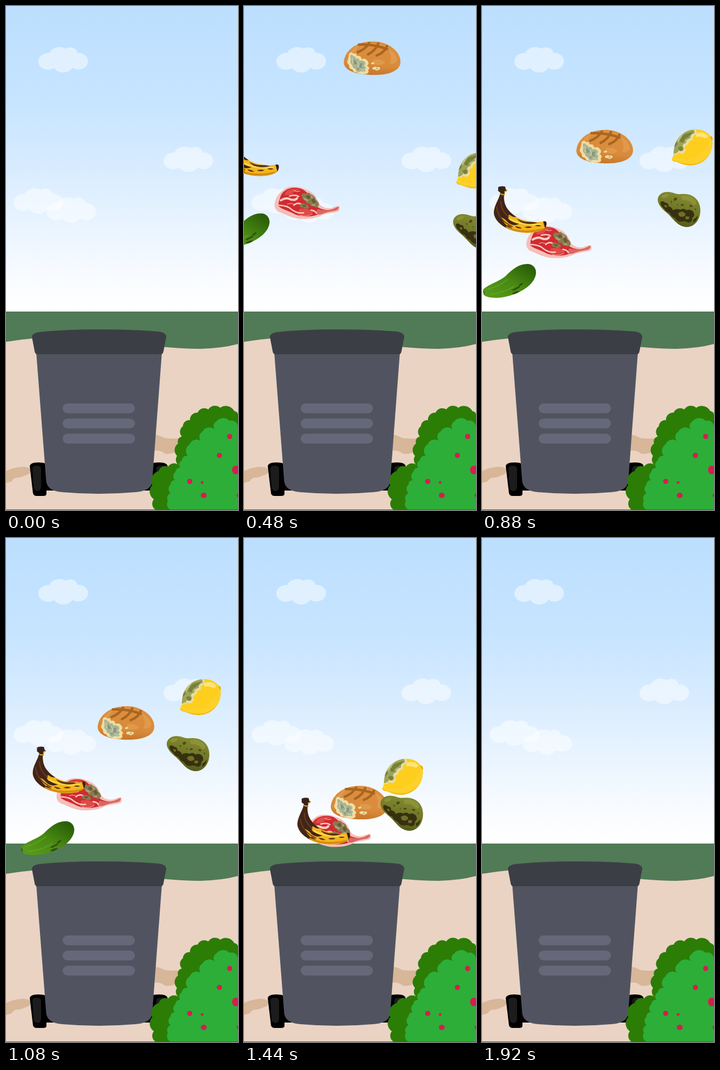
These frames come from a looping animation (430 px wide and 932 px high, 2000 ms). An HTML page:

```html
<!DOCTYPE html>
<html lang="en">
<head>
<meta charset="utf-8">
<title>Food waste</title>
<style>
  html, body { margin: 0; width: 100%; height: 100%; overflow: hidden; background: #fff; }
  svg { display: block; width: 430px; height: 932px; }
</style>
</head>
<body>
<svg viewBox="0 0 430 932" fill="none">
  <defs>
    <linearGradient id="sky" x1="0" y1="0" x2="0" y2="1">
      <stop stop-color="#bcdfff"/>
      <stop offset=".3" stop-color="#c6e4ff"/>
      <stop offset=".53" stop-color="#d8ecff"/>
      <stop offset=".74" stop-color="#ebf5ff"/>
      <stop offset=".9" stop-color="#fafcff"/>
      <stop offset="1" stop-color="#fff"/>
    </linearGradient>
    <linearGradient id="green" x1="0" y1="1" x2="1" y2="0">
      <stop offset=".1" stop-color="#57991b"/>
      <stop offset=".5" stop-color="#478912"/>
      <stop offset=".9" stop-color="#2b5e08"/>
    </linearGradient>
    <linearGradient id="crust" x1=".6" y1="0" x2=".45" y2="1">
      <stop stop-color="#dc9040"/>
      <stop offset=".7" stop-color="#d98a3b"/>
      <stop offset="1" stop-color="#c67529"/>
    </linearGradient>
    <linearGradient id="skin" x1=".6" y1="0" x2=".3" y2="1">
      <stop stop-color="#858b31"/>
      <stop offset=".6" stop-color="#6c7324"/>
      <stop offset="1" stop-color="#4d5118"/>
    </linearGradient>
    <clipPath id="lemonClip"><use href="#lemonShape"/></clipPath>
    <clipPath id="avoClip"><use href="#avoShape"/></clipPath>
    <clipPath id="bananaClip"><use href="#bananaShape"/></clipPath>
    <path id="lemonShape" d="M3 51C5 44 4 38 6 31C11 11 28 0 46 0C59 0 67 5 72 12Q78 13 76 21C78 41 66 60 46 65C31 69 19 64 10 60Q0 59 1 54Z"/>
    <path id="avoShape" d="M0 14C1 4 10 0 18 0C29 0 31 5 44 4C64 2 79 14 79 34C79 54 66 65 54 65C36 64 30 50 16 38C6 30 0 22 0 14Z"/>
    <path id="bananaShape" d="M12 13C10 24 0 36 0 50C2 66 20 79 41 84C61 89 84 87 95 78Q99 72 97 66Q94 64 90 66C68 68 48 63 36 53C24 43 17 33 19 13Z"/>
    <g id="cloud" fill="#fff">
      <ellipse cx="18" cy="26.500" rx="18" ry="15.500"/>
      <ellipse cx="39" cy="16" rx="20" ry="16"/>
      <ellipse cx="59" cy="11" rx="13" ry="10.500"/>
      <ellipse cx="74" cy="26" rx="18" ry="15.500"/>
      <ellipse cx="46" cy="33" rx="18" ry="14"/>
      <ellipse cx="50" cy="22" rx="28" ry="14"/>
    </g>
    <g id="wheel">
      <path fill="#000" d="M44 851Q45 844 60 844Q75 844 75 850V902Q75 906 69 906H57Q51 906 50 901Z"/>
      <path fill="#1b1c1b" d="M49 855Q49 850 57 850Q65 850 65 856V890Q64 897 58 897Q52 896 51 889Z"/>
    </g>
  </defs>

  <path fill="url(#sky)" d="M0 0H430V566H0Z"/>
  <use href="#cloud" x="60" y="76" opacity=".5"/>
  <use href="#cloud" x="292" y="260" opacity=".5"/>
  <use href="#cloud" x="14" y="337" opacity=".5"/>
  <use href="#cloud" x="75" y="354" opacity=".5"/>

  <path fill="#517a56" d="M0 565H430V660H0Z"/>
  <path fill="#ead3c3" d="M0 621Q60 611 120 612C200 614 270 634 360 634Q400 633 430 625V932H0Z"/>
  <path fill="#d8b698" d="M0 860Q14 853 30 852Q46 852 45 861Q44 866 36 868Q26 873 19 872Q12 875 11 879L0 882Z"/>
  <path fill="#d8b698" d="M270 792Q284 793 294 799Q310 801 324 799V820Q314 820 312 826Q300 830 293 827Q286 820 270 823Z"/>

  <g id="cucumber">
    <path fill="url(#green)" d="M0 48C12 37 30 34 42 23C54 11 66 1 82 1C92 1 98 8 98 17C97 36 76 52 48 60C32 65 10 65 2 59Q0 54 0 48Z"/>
    <path stroke="#76b02e" stroke-width="2" opacity=".45" d="M8 48Q30 42 46 29M13 57Q36 55 58 42"/>
    <path fill="#314f10" d="M0 50Q3 52 2 59Q0 56 0 50ZM53 49q8-4 15-8q1 4-5 6q-7 5-10 2ZM54 55q7-5 14-4q-4 5-13 6ZM66 40q5-5 8-4q-1 5-7 6Z"/>
  </g>

  <g id="meat">
    <path fill="#f5bfb9" d="M0 35C1 22 8 13 15 8C22 1 30 0 41 1C49 1 52 4 57 5C69 9 77 17 80 26C83 34 87 38 96 40C106 42 111 37 119 36Q123 40 119 46C108 50 94 49 85 55C73 60 56 61 45 60C32 58 22 53 13 49Q1 46 0 35Z"/>
    <path fill="#d02b31" d="M10 23C13 9 26 1 43 3C55 4 62 12 67 22C73 34 80 42 98 44Q86 49 78 53C62 58 45 56 33 49C22 44 14 42 8 37Q7 30 10 23Z"/>
    <path fill="#e14a47" d="M22 9Q34 2 48 6Q37 7 32 15Q25 17 18 16ZM46 42Q60 39 73 47Q63 56 43 53Z"/>
    <path fill="#dd655f" d="M80 42Q95 46 108 42L119 37Q120 43 113 45Q98 47 86 52Q72 54 80 42Z"/>
    <g stroke="#f9cdc5" stroke-linecap="round">
      <path stroke-width="4" d="M12 26Q22 20 29 24Q38 27 42 22"/>
      <path stroke-width="2.500" d="M28 18Q39 15 45 19M9 35Q26 36 32 43Q43 51 54 49M36 35Q44 28 52 35M68 44Q76 45 78 50"/>
      <path stroke-width="1" d="M36 8Q42 11 47 9M24 33Q31 30 37 34M48 54Q60 57 70 51"/>
    </g>
    <path fill="#8b7a50" d="M50 16Q53 11 58 14Q63 9 68 15Q75 17 77 25Q84 30 82 36Q77 41 73 37Q67 38 65 32Q58 33 58 27Q51 25 50 16ZM47 34Q53 29 57 33Q65 34 64 40Q57 43 53 39Q46 40 47 34Z"/>
    <path fill="#665b38" d="M58 18l6-2 3 5-5 3ZM68 25l5-3 4 7-5 3ZM51 35l6-1 2 3-5 1Z"/>
    <path fill="#aca17a" d="M54 20l5 3 5 2-3 3-6-3ZM66 16l6 4-3 3ZM68 33l7 0 1 3-5 0Z"/>
  </g>

  <g id="banana">
    <use href="#bananaShape" fill="#f3b51c"/>
    <g clip-path="url(#bananaClip)">
      <path fill="#41251a" d="M7 8H23L23 38Q33 49 42 57Q35 58 29 53Q24 55 28 62Q37 68 47 70Q36 75 27 68Q20 60 14 58Q17 69 30 77L19 79L-4 62V30Z"/>
      <path stroke="#ffd84a" stroke-width="3" d="M30 61Q50 73 88 71"/>
      <path stroke="#d68d13" stroke-width="4" d="M22 76Q52 90 97 79"/>
      <path stroke="#6e3c18" stroke-width="2" d="M5 38Q8 63 35 75M13 28Q13 46 28 57"/>
      <path fill="#5b3515" d="M43 60Q53 66 64 66Q76 66 81 68Q69 72 57 69Q47 67 43 60ZM39 74q9 1 13 4q-8 2-13-4ZM57 76q8-3 14 0q-8 3-14 0ZM76 73q7-2 12 0q-5 3-12 0ZM25 72q5 1 10 7l-9-4Z"/>
      <path fill="#352015" d="M91 64H100V78H95Q93 71 91 64Z"/>
    </g>
    <path fill="#37221b" d="M8 2Q13-1 21 1L22 6L25 8L20 11L20 17L12 17L12 12L8 9Z"/>
    <path fill="#e9ac20" d="M19 10L25 7L24 10L20 12ZM12 13Q16 16 20 14V16Q15 18 12 15Z"/>
  </g>

  <g id="lemon">
    <use href="#lemonShape" fill="#fdce1d"/>
    <g clip-path="url(#lemonClip)">
      <path fill="#f3b915" d="M0 56Q37 69 60 47Q70 38 78 20V70H0Z"/>
      <path fill="#fdd12a" d="M0 50Q35 63 57 43Q70 32 72 14L77 31Q72 55 46 63Q22 66 6 57Z"/>
      <path fill="#ffe47a" d="M46 8Q58 2 67 11Q70 16 62 16Q54 12 46 14Z"/>
      <path fill="#e9dda0" d="M0 46Q8 49 14 43Q22 49 27 38Q21 32 31 28Q32 20 40 19Q38 11 47 9Q49 4 43-2H10L0 18Z"/>
      <path fill="#9da35c" d="M3 45Q11 45 14 39Q23 43 23 34Q18 28 27 25Q29 17 36 16Q34 9 43 7Q44 3 39-2H9L-2 21Z"/>
      <path fill="#798139" d="M17 15Q23 8 31 7L41 4L36 10L30 15Q24 17 23 24Q16 25 15 20ZM12 34q6-5 9 0q1 6-5 6ZM6 27l5-4 0 5-5 5Z"/>
      <path fill="#bec181" d="M10 20q5-9 13-13q-4 8-10 16ZM25 20l6-3-4 6Z"/>
    </g>
    <path fill="#e8a914" d="M72 12Q78 13 76 21Q73 18 72 12Z"/>
  </g>

  <g id="bread">
    <path fill="url(#crust)" d="M0 38C2 16 24 0 54 0C82 0 105 18 105 38C105 54 84 62 58 62C28 62 0 56 0 38Z"/>
    <path fill="#e4a155" opacity=".65" d="M82 13Q98 21 99 35Q96 43 85 41Q91 29 82 13ZM54 34Q71 31 77 40Q68 46 55 42ZM12 20Q18 11 27 7Q24 15 16 24Z"/>
    <path stroke="#aa651f" stroke-width="4.500" stroke-linecap="round" d="M28 6Q54 5 80 14M47 3Q40 15 26 20M64 4Q59 17 45 24M80 9Q75 21 61 26"/>
    <path fill="#eedda3" d="M10 22Q15 18 18 23Q24 20 24 27Q32 25 33 33Q40 30 44 36Q48 40 43 45Q50 49 45 53Q48 58 42 60Q31 62 23 57Q18 58 16 52Q9 51 10 44Q4 39 8 33ZM50 41Q54 36 57 40Q55 44 50 41ZM53 49Q58 45 61 48Q68 46 67 51Q61 56 58 52Q53 53 53 49Z"/>
    <path fill="#a8b394" d="M12 26Q16 23 18 28Q22 27 22 32Q29 30 29 36Q35 34 39 38Q42 42 37 45Q44 48 39 51Q42 56 37 56Q30 54 28 57Q22 56 22 51Q16 49 16 44Q10 40 13 35ZM59 50q4-2 5 1q-3 2-5-1Z"/>
    <path fill="#86967a" d="M17 33l5 3 3 5-5 2ZM29 41l6-1-2 6 3 4-7-2ZM24 49l5 1-3 4Z"/>
    <path stroke="#cbd0b2" stroke-width="1.500" d="M15 30Q19 37 15 41M25 37Q31 44 25 47M32 51L38 54"/>
  </g>

  <g id="avocado">
    <use href="#avoShape" fill="url(#skin)"/>
    <g clip-path="url(#avoClip)">
      <path fill="#93993d" opacity=".7" d="M43 8Q60 4 70 16Q74 25 66 24Q58 14 45 15ZM6 9Q12 2 21 5Q19 10 10 12Z"/>
      <path fill="#373010" d="M5 19Q9 15 14 20Q20 20 20 27Q27 28 28 34Q35 30 42 33Q49 29 53 34Q61 31 66 37Q70 44 64 48Q65 56 57 57Q50 53 45 55Q36 56 32 48Q25 46 22 39Q15 37 12 31Q5 26 5 19ZM66 51Q72 48 74 43Q74 53 66 57Z"/>
      <path fill="#706f27" d="M38 39q8-5 12 0q4 4-3 7q-9 1-9-7ZM52 45l7 1-2 5-6-1ZM12 24l5 1 0 4-4-1Z"/>
      <path fill="#4b4816" d="M30 12q4-3 6 0q-1 5-6 4ZM42 24q4-3 7 0q-3 4-7 0ZM58 25q5-2 7 2q-4 3-7-2ZM24 16l3 2-2 3ZM68 31l3 0 0 4ZM36 22l2 1-1 3Z"/>
    </g>
  </g>

  <path fill="#000" d="M66 878H276V896H66Z"/>
  <use href="#wheel"/>
  <use href="#wheel" transform="translate(343.500) scale(-1 1)"/>
  <path fill="#515460" d="M56 640H289L271 879Q269 897 240 899Q172 905 104 899Q77 897 74.500 879Z"/>
  <path fill="#3c3e46" d="M48 612Q48 605 62 603Q110 598 172 598Q236 598 283 602Q297 604 297 612L292 638Q291 644 287 644H58Q54 644 53 638Z"/>
  <g fill="#666879">
    <rect x="105" y="735" width="134" height="18" rx="9"/>
    <rect x="105" y="763" width="134" height="18" rx="9"/>
    <rect x="105" y="791" width="134" height="18" rx="9"/>
  </g>

  <path id="bushBack" fill="#2b7d06"/>
  <path id="bushFront" fill="#2dae38"/>
  <g fill="#d41e51">
    <circle cx="414.500" cy="796" r="4.800"/>
    <circle cx="395.500" cy="831" r="4.800"/>
    <ellipse cx="426" cy="858" rx="7" ry="8"/>
    <circle cx="340.500" cy="879" r="4.800"/>
    <circle cx="363.500" cy="881" r="2.600"/>
    <ellipse cx="366.500" cy="905" rx="5.500" ry="5"/>
    <circle cx="431" cy="905" r="3.500"/>
  </g>
  <path fill="#5c554f" d="M0 931H430V932H0Z"/>
</svg>

<script>
  const LOOP = 2000, STEP = 40;

  // Waypoints: time, left, top; straight runs between them.
  const routes = {
    cucumber: [[0, -114, 270.5], [1950, 143.4, 726]],
    meat: [[0, -143, 409], [487, 59.3, 332.3], [1950, 143.7, 606.6]],
    banana: [[0, -99, 102], [1950, 169, 614]],
    lemon: [[0, 442.5, 322], [975, 341, 218], [1950, 161, 617]],
    bread: [[0, 197, -131], [1950, 148, 667]],
    avocado: [[0, 461.6, 434], [975, 311, 334], [1950, 189, 632.6]]
  };

  // Joins the points with outward arcs for a leafy edge.
  function leafy(id, points) {
    let d = '';
    points.forEach(([x, y], i) => {
      if (!i) { d = `M${x} ${y}`; return; }
      const [px, py] = points[i - 1];
      const r = Math.hypot(x - px, y - py) * 0.65;
      d += `A${r} ${r} 0 0 1 ${x} ${y}`;
    });
    document.getElementById(id).setAttribute('d', d + 'V932Z');
  }

  leafy('bushBack', [[278, 932], [274, 912], [271, 886], [283, 860], [300, 852], [322, 850],
    [317, 832], [319, 809], [326, 796], [328, 777], [341, 766], [355, 752], [375, 746],
    [397, 743], [423, 749], [430, 760]]);
  leafy('bushFront', [[306, 932], [300, 915], [305, 901], [305, 885], [313, 877], [314, 862],
    [323, 854], [326, 840], [337, 832], [340, 811], [361, 804], [364, 787], [387, 783],
    [389, 769], [414, 767], [430, 777]]);

  function place(t, route) {
    let i = 1;
    while (i < route.length - 1 && t > route[i][0]) i++;
    const [t0, x0, y0] = route[i - 1], [t1, x1, y1] = route[i];
    const k = Math.min(1, (t - t0) / (t1 - t0));
    return [x0 + (x1 - x0) * k, y0 + (y1 - y0) * k];
  }

  function draw(t) {
    for (const name in routes) {
      const [x, y] = place(t, routes[name]);
      document.getElementById(name).setAttribute('transform', `translate(${x} ${y})`);
    }
  }

  const start = performance.now();
  function tick() {
    const t = (performance.now() - start) % LOOP;
    draw(Math.floor(t / STEP) * STEP);
    requestAnimationFrame(tick);
  }
  tick();
</script>
</body>
</html>
```
